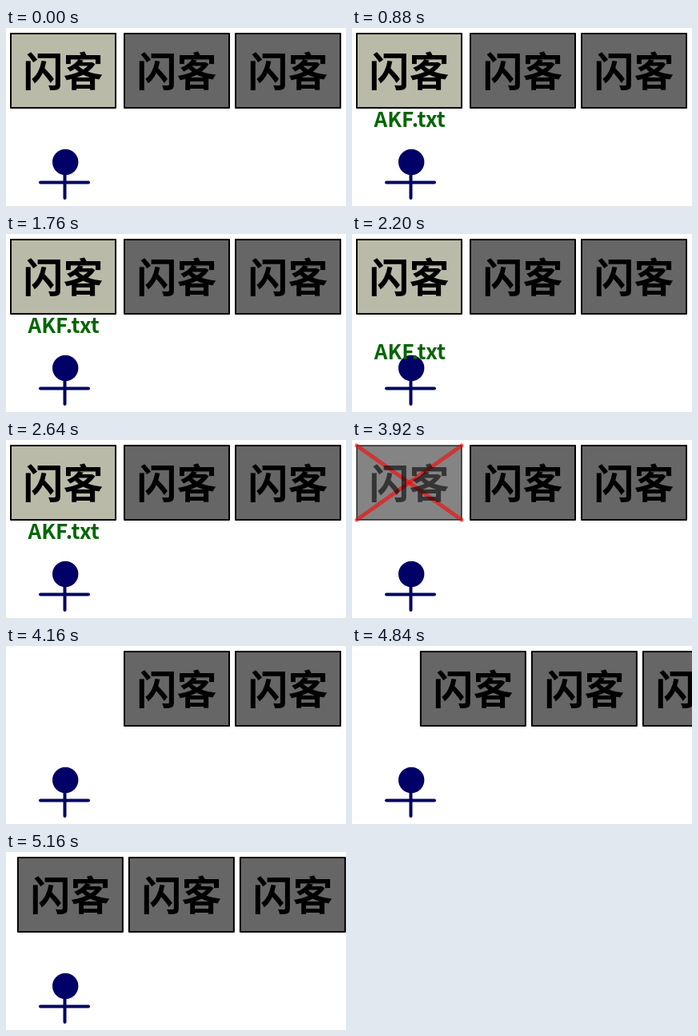
These frames come from a looping animation (425x223 px, 5200 ms). An HTML page with a canvas:

```html
<!DOCTYPE html>
<html lang="zh">
<head>
<meta charset="utf-8">
<style>
html, body { margin: 0; width: 100%; height: 100%; overflow: hidden; background: #fff; }
canvas { display: block; width: 425px; height: 223px; }
</style>
</head>
<body>
<canvas id="stage"></canvas>
<script>
const W = 425, H = 223, LOOP = 5200, STEP = 40;
const NAVY = '#000066', GREY = '#666666', DARK = '#333333', BEIGE = '#babaa9';
const FONT = '"Noto Sans CJK SC", "Noto Sans CJK", "Noto Sans CJK JP", sans-serif';
const SLOTS = [6, 148, 287, 426];

const canvas = document.getElementById('stage');
const ratio = window.devicePixelRatio || 1;
canvas.width = W * ratio;
canvas.height = H * ratio;
const ctx = canvas.getContext('2d');
ctx.scale(ratio, ratio);
ctx.lineCap = ctx.lineJoin = 'round';

const mix = (a, b, p) => a + (b - a) * p;

function line(color, width, x1, y1, x2, y2) {
  ctx.strokeStyle = color;
  ctx.lineWidth = width;
  ctx.beginPath();
  ctx.moveTo(x1, y1);
  ctx.lineTo(x2, y2);
  ctx.stroke();
}

function label(text, size, color, x, y) {
  ctx.font = `bold ${size}px ${FONT}`;
  ctx.textAlign = 'center';
  ctx.fillStyle = color;
  ctx.fillText(text, x, y);
}

function card(x, fill, crossed) {
  ctx.fillStyle = fill;
  ctx.fillRect(x, 7, 131, 93);
  ctx.strokeStyle = '#000';
  ctx.lineWidth = 2;
  ctx.strokeRect(x, 7, 131, 93);
  if (crossed) {
    line('#ff0000', 5, x, 7, x + 131, 100);
    line('#ff0000', 5, x + 131, 7, x, 100);
  }
  label('闪客', 50, '#000', x + 65.5, 72.5);
}

function person() {
  ctx.fillStyle = NAVY;
  ctx.beginPath();
  ctx.arc(74.2, 168, 16.2, 0, Math.PI * 2);
  ctx.fill();
  line(NAVY, 4, 73.5, 180, 73.5, 213);
  line(NAVY, 4, 43, 193.5, 103, 193.5);
}

// The file travels up to the card, then back down, three times.
function file(n) {
  const k = n % 22, p = (k % 11) / 10;
  const y = k < 11 ? mix(171, 99, p) : mix(111.5, 172.8, p);
  const x = k < 11 ? 72.3 : mix(72.3, 71.8, p);
  label('AKF.txt', 26, '#006600', x, y);
}

function firstCard(t) {
  if (t < 3360) return card(SLOTS[0], BEIGE);
  ctx.globalAlpha = t < 3800 ? 1 : Math.max(0, 1 - (t - 3760) / 400);
  if (ctx.globalAlpha > 0) card(SLOTS[0], DARK, true);
  ctx.globalAlpha = 1;
}

function draw(now) {
  const t = Math.floor((now % LOOP) / STEP) * STEP;
  const shift = t < 4600 ? 0 : 142 * (t - 4560) / 640;
  ctx.fillStyle = '#fff';
  ctx.fillRect(0, 0, W, H);
  if (t < 4160) firstCard(t);
  for (const x of SLOTS.slice(1)) card(x - shift, GREY);
  person();
  if (t >= 360 && t < 3000) file((t - 360) / STEP);
}

let start;
function tick(now) {
  if (start === undefined) start = now;
  draw(now - start);
  requestAnimationFrame(tick);
}
draw(0);
requestAnimationFrame(tick);
</script>
</body>
</html>
```
